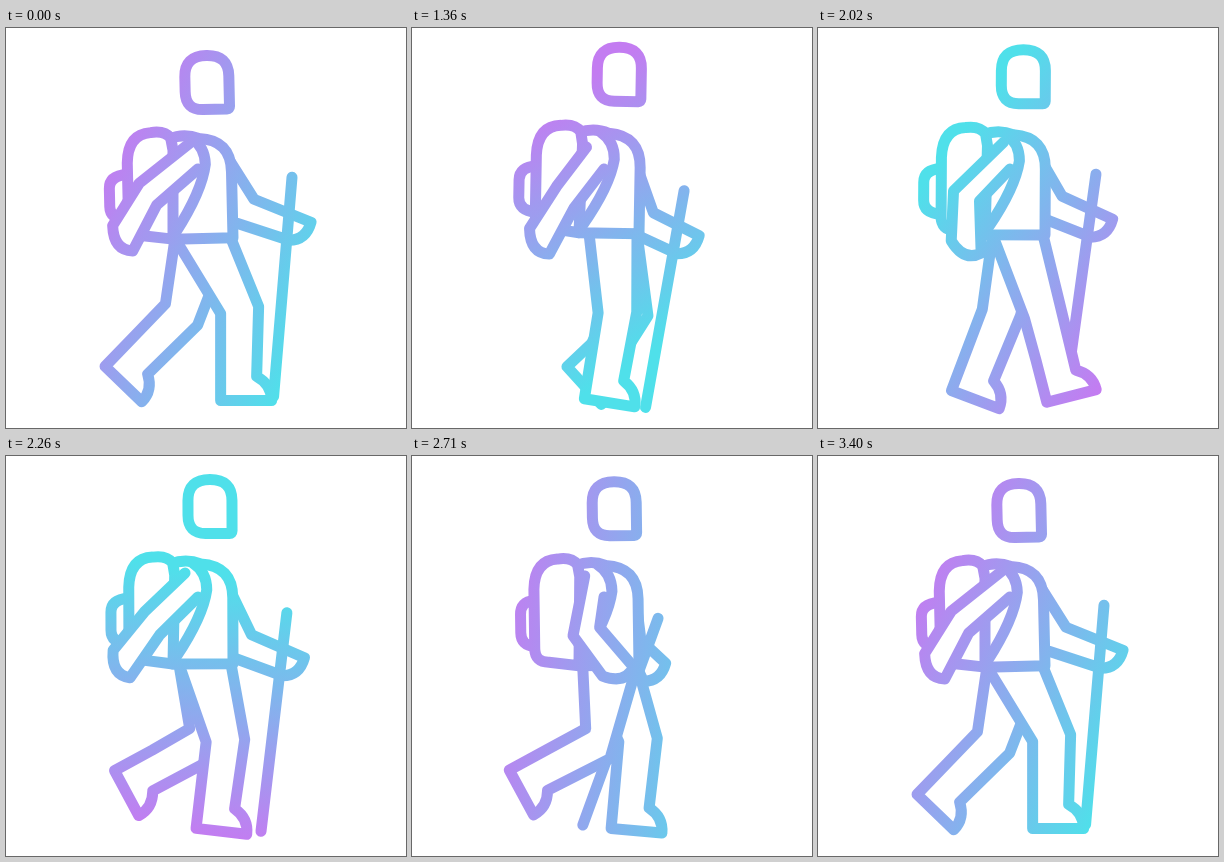
An HTML page that plays this animation: 400 px wide and 400 px high, repeating every 3430 ms.

```html
<!DOCTYPE html>
<html>
<head>
<meta charset="utf-8">
<style>
html, body { margin: 0; width: 100%; height: 100%; overflow: hidden; background: #fff; }
svg { display: block; width: 100vw; height: 100vh; }
.line { fill: none; stroke: url(#tint); stroke-width: 11; stroke-linecap: round; stroke-linejoin: round; }
.solid { fill: #fff; }
</style>
</head>
<body>
<svg viewBox="0 0 400 400">
  <defs>
    <linearGradient id="tint" gradientUnits="userSpaceOnUse">
      <stop offset="0" stop-color="#c37cf1"/>
      <stop offset="1" stop-color="#4fe0ea"/>
    </linearGradient>
  </defs>
  <path id="farArm" class="line solid"/>
  <path id="pole" class="line"/>
  <path id="farLeg" class="line solid"/>
  <path id="nearLeg" class="line solid"/>
  <g id="torso">
    <path id="pocket" class="line solid"/>
    <path class="line solid" d="M165 107Q180 101 195 107Q227 109 227 141V207H167Z"/>
    <path class="line solid" d="M167 207L137 203Q123 203 123 189V130Q124 101 147 100Q161 98 167 106L169 118Z"/>
    <path class="line" d="M187 106Q201 115 201 133Q197 160 170 200"/>
    <path id="head" class="line solid" d="M224 76H200Q182.500 76 182.500 58V43Q182.500 22 204.500 22Q226.500 22 226.500 43V73.500Q226.500 76 224 76Z"/>
  </g>
  <path id="nearArm" class="line solid"/>
</svg>
<script>
const LOOP = 3430, HOLD = 1000, WALK = 2400, STRIDES = 2;
const HIP_X = 199, HIP_Y = 207, THIGH = 79, POLE = 220;

// Joint angles in degrees at key phases of one stride
const THIGH_SWING = [[0, 26], [.25, -1], [.5, -17], [.75, 21], [.88, 18]];
const SHIN_SWING = [[0, 0], [.25, 12], [.45, 32], [.6, 62], [.75, 5], [.93, -21]];

const el = id => document.getElementById(id);
const draw = (id, d) => el(id).setAttribute('d', d);
const rad = deg => deg * Math.PI / 180;
const turn = phase => Math.cos(2 * Math.PI * phase);
const smooth = s => s * s * (3 - 2 * s);
const at = (...n) => n.map(v => v.toFixed(2)).join(' ');

// Smooth cyclic curve through key points
function cycle(keys, phase) {
  const n = keys.length;
  const key = i => [keys[(i + n) % n][0] + Math.floor(i / n), keys[(i + n) % n][1]];
  let i = 0;
  while (i < n - 1 && keys[i + 1][0] <= phase) i++;
  const [a, b, c, d] = [i - 1, i, i + 1, i + 2].map(key);
  const span = c[0] - b[0], s = (phase - b[0]) / span;
  const m0 = (c[1] - a[1]) / (c[0] - a[0]) * span;
  const m1 = (d[1] - b[1]) / (d[0] - b[0]) * span;
  return b[1] + (c[1] - b[1]) * smooth(s) + s * (1 - s) * ((1 - s) * m0 - s * m1);
}

// Cubic bezier ease (.2, 0, .75, 1)
function ease(x) {
  let lo = 0, hi = 1;
  for (let i = 0; i < 30; i++) {
    const s = (lo + hi) / 2, r = 1 - s;
    if (.6 * r * r * s + 2.25 * r * s * s + s * s * s < x) lo = s; else hi = s;
  }
  return smooth(lo);
}

// Maps points of a rigid limb hung at (x, y); positive angles swing it backwards
function limb(x, y, deg) {
  const c = Math.cos(rad(deg)), s = Math.sin(rad(deg));
  return (px, py) => [x + px * c - py * s, y + px * s + py * c];
}

function leg(id, phase, lift) {
  const swing = rad(cycle(THIGH_SWING, phase));
  const shin = cycle(SHIN_SWING, phase);
  const droop = 27 * Math.exp(-(((phase - .73) / .07) ** 2));
  const hipY = HIP_Y + lift;
  const p = limb(HIP_X + THIGH * Math.sin(swing), hipY + THIGH * Math.cos(swing), shin);
  const foot = limb(...p(8, 54), shin + droop);
  draw(id, 'M' + at(173.5 - 4.5 * turn(2 * phase), hipY) +
    'L' + at(...p(-19, 4), ...p(-19, 47), ...foot(-27, 37), ...foot(24, 37)) +
    'Q' + at(...foot(24, 21), ...foot(9, 13)) +
    'L' + at(...p(19, -3), 225, hipY));
}

function nearArm(phase) {
  const w = turn(phase), raise = turn(phase + .1);
  const p = limb(159 - 17 * w, 171 - 5 * w, -1 + 38 * turn(phase - .1));
  draw('nearArm', 'M' + at(177 + 9 * raise, 118 - 4 * raise) +
    'L' + at(...p(-13, -5), ...p(-15, 45)) +
    'Q' + at(...p(-2, 66), ...p(15, 57)) +
    'L' + at(...p(13, 5), 192, 141));
}

function farArm(phase) {
  const w = turn(phase);
  const x = 278 + 27 * w, y = 203 + 12 * turn(phase - .38);
  draw('farArm', 'M222 130L' + at(238 + 10 * w, y - 23, x, y) +
    'Q' + at(x - 5, y + 18, x - 22, y + 18) + 'L' + at(227 + 4 * w, y + 1));

  const gripX = x - 13 - 6 * w, gripY = y - 45, lean = rad(12.8 - 8 * w);
  draw('pole', 'M' + at(gripX, gripY) +
    'L' + at(gripX - POLE * Math.sin(lean), gripY + POLE * Math.cos(lean)));
}

function torso(phase, bob, lift) {
  el('torso').setAttribute('transform',
    `translate(0 ${at(lift)}) rotate(${at(-1.3 * bob)} 195 207)`);
  el('head').setAttribute('transform', `translate(0 ${at(.3 + 1.8 * bob)})`);
  const x = 107 - 2.5 * turn(phase);
  draw('pocket', `M123 141Q${x} 142 ${x} 155V173Q${x} 186 123 187`);
}

// The gradient makes one full turn during the walk
function tint(u) {
  const a = rad(25 + 360 * smooth(Math.min(1, 1.22 * u)));
  const dx = 131 * Math.cos(a), dy = 131 * Math.sin(a);
  const cx = 210, cy = 215 - 35 * Math.sin(a);
  const ends = { x1: cx - dx, y1: cy - dy, x2: cx + dx, y2: cy + dy };
  for (const k in ends) el('tint').setAttribute(k, ends[k]);
}

function render(ms) {
  const u = Math.max(0, Math.min(1, (ms - HOLD) / WALK));
  const phase = ease(u) * STRIDES % 1;
  const bob = turn(2 * phase), lift = .5 + 3 * bob;
  tint(u);
  farArm(phase);
  leg('farLeg', (phase + .5) % 1, lift);
  leg('nearLeg', phase, lift);
  torso(phase, bob, lift);
  nearArm(phase);
}

const start = performance.now();
function tick() {
  render((performance.now() - start) % LOOP);
  requestAnimationFrame(tick);
}
render(0);
requestAnimationFrame(tick);
</script>
</body>
</html>
```
